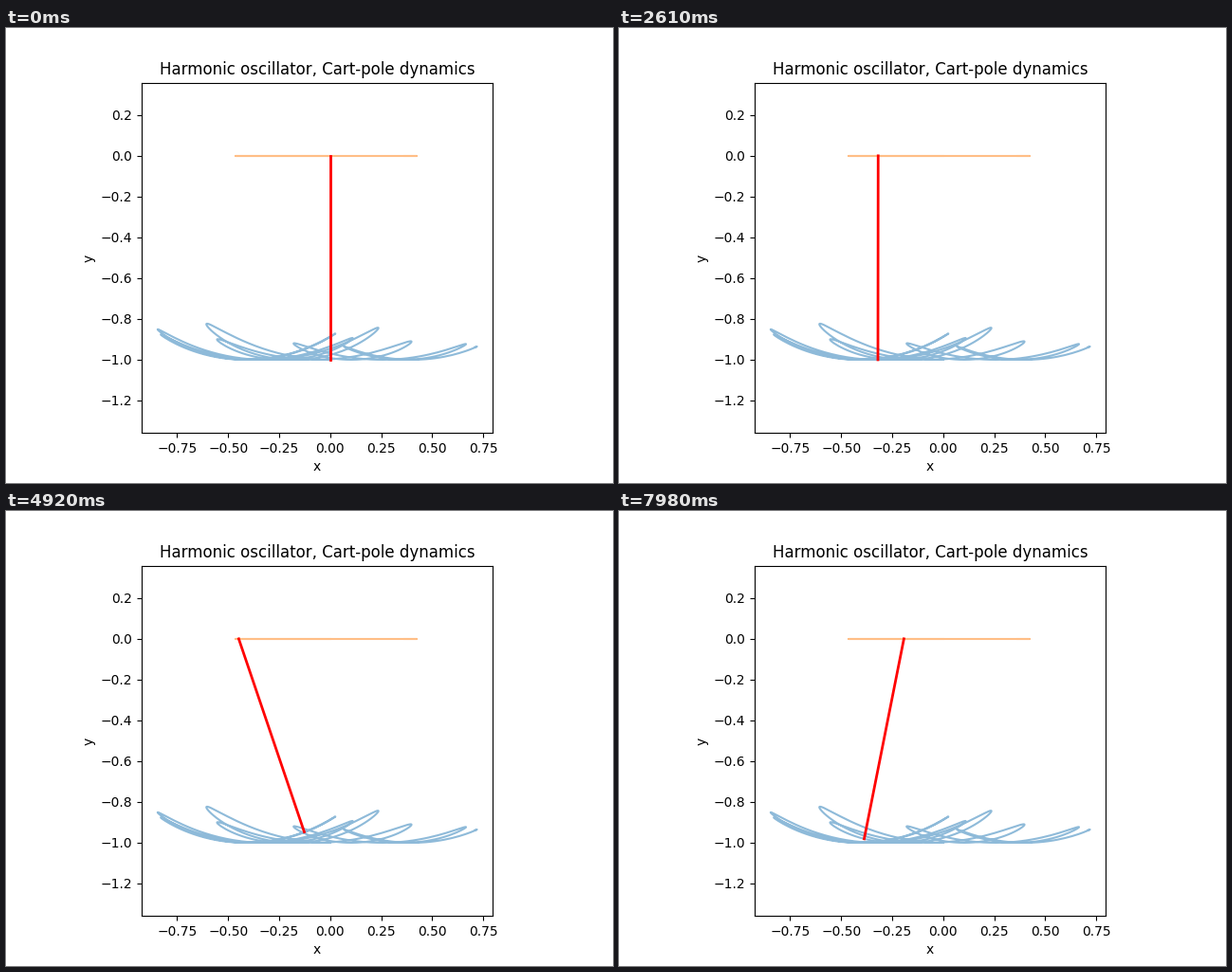
Recreate the animation shown at these times as a matplotlib script. Size 640 px wide and 480 px high, loop 8 s.

```python
import numpy as np
import matplotlib.pyplot as plt
from matplotlib.animation import FuncAnimation

LOOP_MS = 8000
FRAMES = 267
STEP = 0.03      # seconds of motion per frame
PATH_END = 15.0  # the drawn path runs past the loop

DECAY = 0.0373   # damping of the swing


def state(t):
    """Cart position and pole angle: a slow spring mode plus a damped swing."""
    # The swing speeds up slightly as its amplitude shrinks.
    phase = 2.4765 * t - 1.0724 * (1 - np.exp(-2 * DECAY * t))
    swing = -0.617 * np.exp(-DECAY * t) * np.sin(phase)
    drift = -0.4265 * np.exp(-0.004 * t) * np.sin(0.327 * t)
    return drift - 0.09 * swing, swing + 0.02 * drift


def tip(x, angle):
    return x + np.sin(angle), -np.cos(angle)


fig = plt.figure(figsize=(6.4, 4.8), dpi=100)
ax = fig.add_subplot()
ax.set_aspect("equal", adjustable="box")
ax.set_xlim(-0.9231, 0.7951)
ax.set_ylim(-1.3591, 0.3591)
ax.set_title("Harmonic oscillator, Cart-pole dynamics")
ax.set_xlabel("x")
ax.set_ylabel("y")

t = np.arange(0, PATH_END, STEP)
cart, angle = state(t)
ax.plot(*tip(cart, angle), color="C0", alpha=0.5)
ax.plot(cart, np.zeros_like(cart), color="C1", alpha=0.5)
pole, = ax.plot([], [], color="red", lw=2)


def draw(i):
    x, a = state(i * STEP)
    tx, ty = tip(x, a)
    pole.set_data([x, tx], [0, ty])
    return pole,


anim = FuncAnimation(fig, draw, frames=FRAMES, interval=LOOP_MS / FRAMES,
                     init_func=lambda: draw(0), repeat=True, repeat_delay=0)
plt.show()
```
